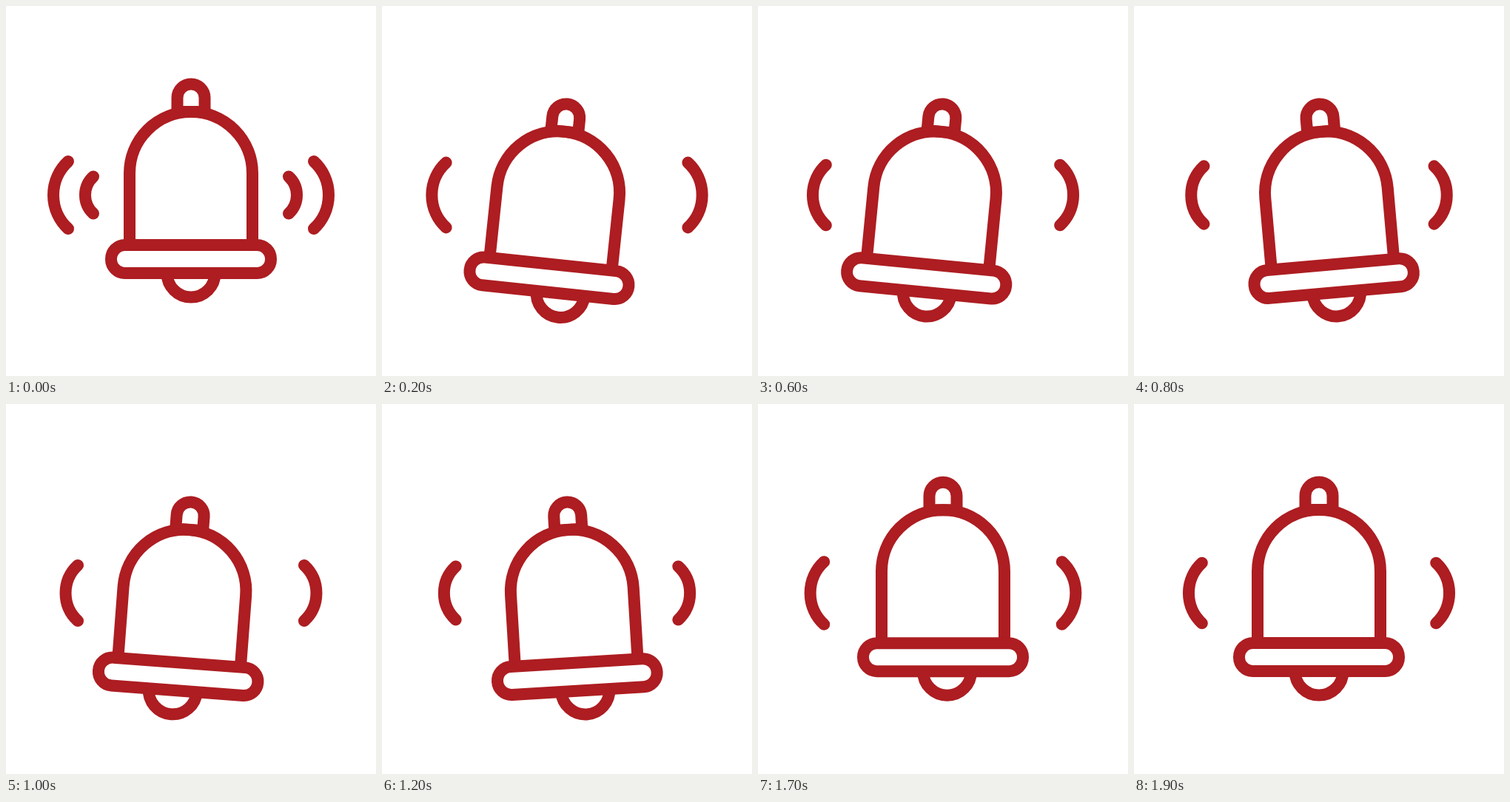
Recreate the animation shown at these times as an HTML page. Size 500x500 px, loop 2 s.

```html
<!DOCTYPE html>
<html lang="en">
<head>
<meta charset="utf-8">
<title>Ringing bell</title>
<style>
  html, body { margin: 0; width: 100%; height: 100%; overflow: hidden; background: #fff; }
  svg { display: block; width: 100%; height: 100%; }
</style>
</head>
<body>
<svg viewBox="0 0 500 500" fill="none" stroke="#ad1d21" stroke-width="16">
  <g id="bell">
    <path d="M231.5 143V124a18.5 18.5 0 0 1 37 0V143Z"/>
    <path d="M167 323V226a83 83 0 0 1 166 0V323"/>
    <rect x="142" y="323" width="216" height="38" rx="18.8"/>
    <path id="clapper" d="M217.5 361a32.5 32.5 0 0 0 65 0"/>
  </g>
  <g stroke-linecap="round">
    <path id="outer"/>
    <path id="inner"/>
  </g>
</svg>
<script>
  const LOOP = 2000, STEP = 100, WAVE = 1300, DROP = 27;
  const [bell, clapper, outer, inner] =
    ['bell', 'clapper', 'outer', 'inner'].map(id => document.getElementById(id));

  const mix = (a, b, p) => a + (b - a) * p;
  const ease = p => (1 - Math.cos(Math.PI * p)) / 2;

  // Eased interpolation through [time, value] keys
  function track(keys, t) {
    const i = keys.findIndex(k => k[0] > t);
    if (i === 0) return keys[0][1];
    if (i < 0) return keys[keys.length - 1][1];
    const [t0, a] = keys[i - 1], [t1, b] = keys[i];
    return mix(a, b, ease((t - t0) / (t1 - t0)));
  }

  // Alternating extremes of equal size, spaced evenly
  const swings = (start, half, size, count) =>
    Array.from({ length: count }, (_, k) => [start + half * k, k % 2 ? -size : size]);

  const tilt = [[0, 0], ...swings(200, 213, 6, 6), [1478, 3.6], [1691, 0]];
  const sway = [[0, 0], [180, 19], ...swings(328, 186.6, -19, 7), [1634, 9], [1790, 0]];
  const drop = [[0, 0], [190, DROP], [1300, DROP], [1720, 0]];

  // Pair of mirrored arcs: p = 0 is the large one, p = 1 the small one
  function arcs(p) {
    const x = mix(84, 118, p), h = mix(45.5, 25, p), r = mix(61.8, 33.9, p);
    const arc = (x, sweep) => `M${x} ${255.5 - h}A${r} ${r} 0 0 ${sweep} ${x} ${255.5 + h}`;
    return arc(x, 0) + arc(500 - x, 1);
  }

  function draw(t) {
    bell.setAttribute('transform',
      `translate(0 ${track(drop, t)}) rotate(${track(tilt, t)} 250 112)`);
    clapper.setAttribute('transform', `translate(${track(sway, t)} 0)`);
    const w = t % WAVE;
    outer.setAttribute('d', arcs(w / (2 * WAVE)));
    inner.setAttribute('visibility', w < STEP ? 'visible' : 'hidden');
  }

  inner.setAttribute('d', arcs(1));
  const begin = performance.now();
  function tick() {
    const t = (performance.now() - begin) % LOOP;
    draw(Math.floor(t / STEP) * STEP);
    requestAnimationFrame(tick);
  }
  tick();
</script>
</body>
</html>
```
